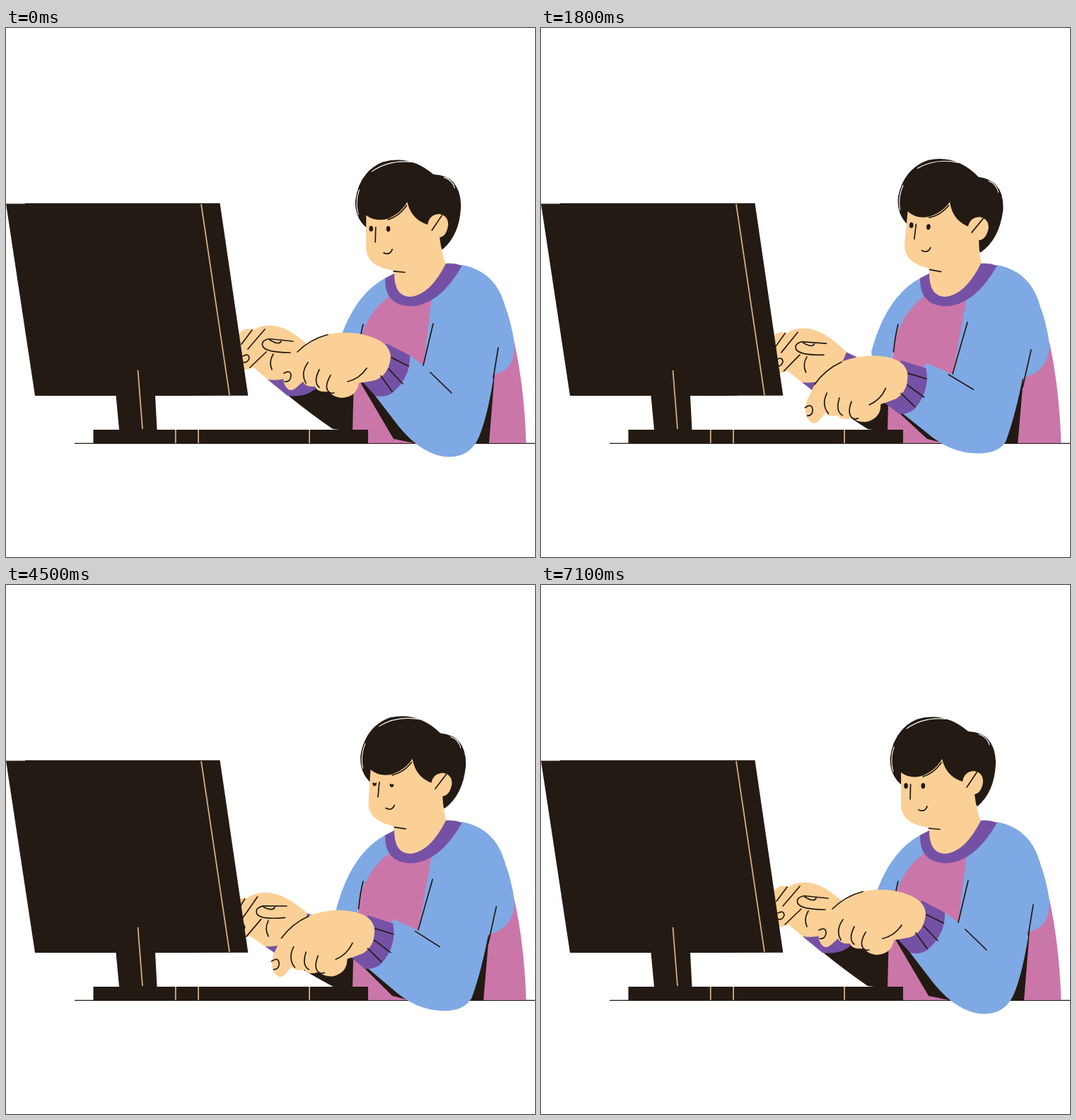
Recreate the animation shown at these times as an HTML page. Size 748 px wide and 748 px high, loop 7.2 s.

```html
<!DOCTYPE html>
<html lang="en">
<head>
<meta charset="utf-8">
<title>Typing at a desk</title>
<style>
  html, body { margin: 0; width: 100%; height: 100%; overflow: hidden; background: #fff; }
  svg { display: block; width: 748px; height: 748px; }
  .dark { fill: #231a13; }
  .skin { fill: #fbd096; }
  .blue { fill: #7fa9e4; }
  .pink { fill: #cb76a9; }
  .purple { fill: #7551a5; }
  .ink, .tan, .shine { fill: none; stroke: #231a13; stroke-width: 1.7; stroke-linecap: round; stroke-linejoin: round; }
  .tan { stroke: #d3ae82; stroke-width: 1.8; stroke-linecap: butt; }
  .shine { stroke: #fff; stroke-width: 1.1; }
</style>
</head>
<body>
<svg viewBox="0 0 748 748">
  <path class="dark" d="M97 586.700H748V588H97Z"/>

  <!-- torso -->
  <path class="pink" d="M540 378Q505 405 503 430L498 460L490 500V568L512 587H735.500Q733 510 719 445L602 380Z"/>
  <path class="blue" d="M548 348Q490 371 467 458L470 475H495L498 458Q504 408 541 380Z"/>
  <path class="ink" d="M505 419Q501 434 498.500 458"/>
  <path class="dark" id="gapFront"/>
  <path class="dark" id="gapBack"/>
  <path class="blue" id="sleeve"/>
  <path class="ink" id="folds"/>

  <!-- head -->
  <path class="skin" d="M549 340V358Q552 385 572 385Q602 382 622 333Z"/>
  <g id="head">
    <path class="dark" d="M511 284Q493 270 493.500 245Q498 205 531 190Q570 178 604 207Q641 208 643 250Q642 292 617 313L590 290L560 290Z"/>
    <path class="shine" d="M498 264Q493 246 499 229M517 203Q541 186 574 189.500M619 211Q631 215 634 226"/>
    <path class="skin" d="M509 265Q522 275 540 269.500Q558 262 567 246Q573 271 596 278Q598 264 612 263Q625 265 625 278Q623 294 613 296Q616 320 622 334L600 362H553L549 343Q510 338 509 312Z"/>
    <path class="ink" d="M540 271Q556 266 566 251M616 265L602 286M522.500 282L522 303M534 318Q543 322 546 313M548 344L564 345.500"/>
    <g class="dark">
      <ellipse cx="516" cy="284" rx="2.800" ry="4"/>
      <ellipse cx="540.300" cy="284" rx="2.800" ry="4"/>
    </g>
    <path class="skin" id="lids" d="M512 279H520V282.300L516 284L512 282.300ZM536 279H545V282.300L540.500 284L536 282.300Z"/>
  </g>
  <path class="purple" d="M536 354L549 347Q549 380 572 380Q600 377 622 333Q634 332 645 336Q612 394 570 393.500Q535 391 536 354Z"/>

  <!-- far arm -->
  <path class="dark" id="forearm"/>
  <g id="farHand">
    <path class="purple" d="M370 497Q417 498 434 456L448 463Q461 477 440 508Q425 523 398 520Z"/>
    <path class="skin" d="M434 456Q405 425 380 421Q362 419 350 427Q338 422 330 432Q316 436 320 450Q322 465 328 466Q326 484 334 484Q343 483 350 480L370 497Q417 503 434 456Z"/>
    <path class="ink" d="M348 427L333 447M366 426L342 454M406 443L372 439.500Q360 442 363 450Q368 459 402 459M389 443Q386 449 373 441M378 461Q371 472 376 483M368 458L345 480M335 464Q343 459 344 467Q341 475 334 472"/>
  </g>

  <!-- computer -->
  <path class="dark" d="M0 248.500H27V247.700H302.500L342.300 519.700L211 520L213.500 568H512V587.300H123.500V568H160L155.500 520H41Z"/>
  <path class="tan" d="M276 249L316 519M186.500 484L193 567M239.800 568V587M272 568V587M429 568V587"/>

  <!-- near hand -->
  <g id="nearHand">
    <path class="purple" d="M538 446L571 463Q572 495 545 517Q534 523 522 520L500 496Z"/>
    <path class="skin" d="M414 455Q430 440 455 433Q490 427 517 437Q543 446 544 465Q542 490 522 498Q508 501 499 502Q496 522 474 523Q461 521 457 514Q440 516 437 507Q423 508 420 500L411 508Q401 517 395 506Q389 497 397 479Z"/>
    <path class="ink" d="M412 458Q430 440 455 433.500M393 488Q403 483 403 492Q402 501 394 500M427 473Q416 488 424 502M443 483Q434 501 443 508M459 491Q449 508 457 515Q460 517 464 516M510 481Q500 496 483 500M545 466L569 478M541 482L561 503M530 492L546 514"/>
  </g>
</svg>
<script>
const LOOP = 7200, BREATH = 3600, TAP = 433, STEP = 100;
const el = Object.fromEntries([...document.querySelectorAll('[id]')].map(e => [e.id, e]));

// Each flexible shape has a resting path and a pressed path with matching points.
const shapes = {
  sleeve: [
    'M602 382L590 477L568 461L550 495L522 520L555 563Q590 606 627 606.5Q656 606 668 580Q681 550 690 490Q719 485 719 447Q715 418 706 394C698 364 680 342 645 335Z',
    'M602 382L582 490L545 474L523 510L507 542L545 572Q578 601 617 601.5Q646 602 657 585Q670 550 681 495Q719 485 719 447Q715 418 706 394C698 364 680 342 645 335Z'],
  folds: [
    'M604 418L590 477M600 487L630 516M696 452L689 495',
    'M603 416L582 489M576 490L611 511M693 455L681 508'],
  gapFront: [
    'M498 496L548 581L582 588L560 550L525 510Z',
    'M485 525L546 581L565 586L550 560L510 530Z'],
  gapBack: [
    'M691 488L683 587H664L670 520Z',
    'M682 495L674 588H652L660 520Z'],
  forearm: [
    'M398 519Q430 545 462 567L490 570L492 490L445 470Z',
    'M398 566Q430 570 465 571L490 571L492 490L430 495Z']
};

const clamp = x => Math.min(1, Math.max(0, x));
const smooth = x => x * x * (3 - 2 * x);
const wave = x => (1 + Math.cos(2 * Math.PI * x)) / 2;

function bend(id, amount) {
  const [rest, pressed] = shapes[id];
  const ends = pressed.match(/[\d.]+/g);
  let i = 0;
  el[id].setAttribute('d', rest.replace(/[\d.]+/g, n => +n + (ends[i++] - n) * amount));
}

function place(id, dx, dy, angle, x, y) {
  el[id].setAttribute('transform', `translate(${dx} ${dy}) rotate(${angle} ${x} ${y})`);
}

function draw(now) {
  const t = Math.floor(now / STEP) * STEP % LOOP;
  const u = t % BREATH;
  const typing = smooth(clamp((u - 400) / 150)) * smooth(clamp((2800 - u) / 250));
  const tap = wave((u - 970) / TAP);
  const near = typing * (0.19 + 0.81 * smooth(tap));
  const far = typing * (1 - tap);

  for (const id of ['sleeve', 'folds', 'gapFront', 'gapBack']) bend(id, near);
  bend('forearm', far);
  place('nearHand', -25 * near, 36 * near, -10.2 * near ** 0.75, 470, 465);
  place('farHand', -38 * far, 46 * far, -24 * far, 407, 443);
  place('head', 0, 0, 5.7 * wave((u - 1600) / BREATH), 573, 361);
  el.lids.style.display = t >= 3600 && t < 4600 ? '' : 'none';
}

const start = performance.now();
function frame() {
  draw(performance.now() - start);
  requestAnimationFrame(frame);
}
frame();
</script>
</body>
</html>
```
